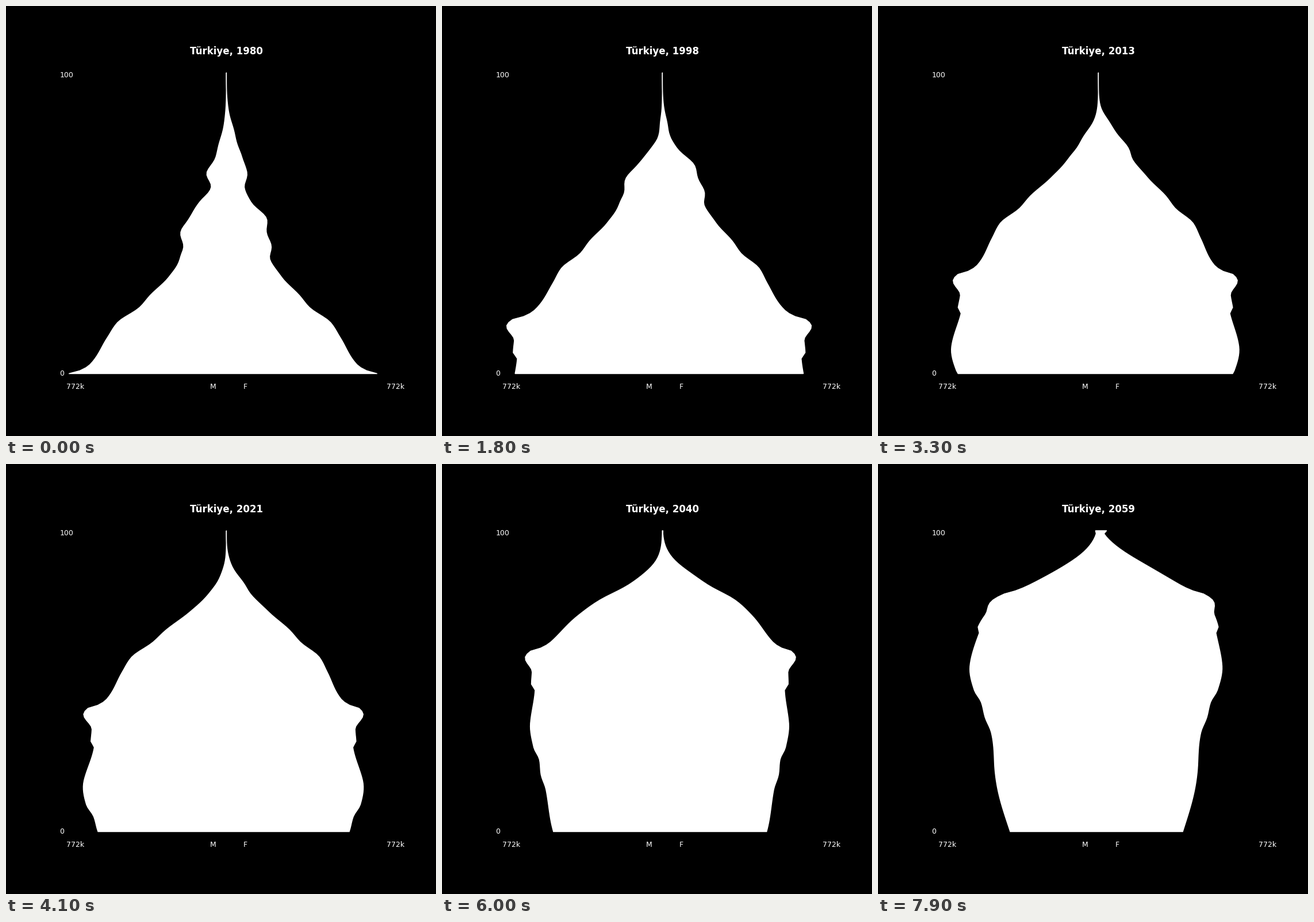
Animation of 748 by 748 pixels, one loop 8 s. Source, as a matplotlib script:

```python
import numpy as np
import matplotlib.pyplot as plt
from matplotlib.animation import FuncAnimation

SIZE, DPI = 748, 100
START, YEARS = 1980, 80
LIMIT = 772  # thousands of people at the edge of the axes
AGES = np.arange(101)

# turning points of the birth curve: year, thousands of boys
BIRTHS = np.array([
    (1890, 160), (1908, 128), (1913, 152), (1918, 107), (1923, 152), (1929, 221),
    (1934, 237), (1941, 240), (1948, 301), (1954, 389), (1958, 434), (1963, 530),
    (1968, 567), (1977, 637), (1979, 682), (1980, 733), (1982, 754), (1987, 703),
    (1991, 701), (1993, 679), (2004, 693), (2012, 661), (2016, 621), (2021, 597),
    (2026, 559), (2039, 511), (2059, 410)], float)


def pchip(x, y, q):
    """Shape-preserving cubic through (x, y), evaluated at q."""
    h, d = np.diff(x), np.diff(y) / np.diff(x)
    m = np.r_[d[0], np.zeros(len(x) - 2), d[-1]]
    same = d[:-1] * d[1:] > 0
    a, b = np.where(same, d[:-1], 1), np.where(same, d[1:], 1)
    w1, w2 = 2 * h[1:] + h[:-1], h[1:] + 2 * h[:-1]
    m[1:-1] = np.where(same, (w1 + w2) / (w1 / a + w2 / b), 0)
    q = np.clip(q, x[0], x[-1])
    i = np.clip(np.searchsorted(x, q) - 1, 0, len(h) - 1)
    s = (q - x[i]) / h[i]
    return ((1 + 2 * s) * (1 - s) ** 2 * y[i] + s * (1 - s) ** 2 * h[i] * m[i]
            + s * s * (3 - 2 * s) * y[i + 1] + s * s * (s - 1) * h[i] * m[i + 1])


def sigmoid(x):
    return 1 / (1 + np.exp(-x))


def survival(age, born, level, slope, gain):
    """Losses among young adults, then mortality that eases for later cohorts."""
    young = 1 - 0.11 * sigmoid((age - 20) / 6) - 0.0004 * age
    old = age - 79
    hazard = np.exp(level + slope * old - 0.0007 * old ** 2
                    - gain * (np.maximum(born, 1920) - 1980))
    return young * np.exp(-hazard)


def people(year):
    """Men and women at each age; the last bin gathers ages 100 to 102."""
    age = np.arange(103)
    born = year - age
    births = pchip(*BIRTHS.T, born)
    # early cohorts alternate between more men and more women
    wave = (0.05 * np.cos(2 * np.pi * (born - 1938) / 10)
            * sigmoid((1941 - born) / 1.5))
    men = births * (1 - wave) * survival(age, born, -1.0, 0.104, 0.025)
    women = 0.957 * births * (1 + wave) * survival(age, born, -1.55, 0.115, 0.026)
    return [np.r_[n[:100], n[100:].sum()] for n in (men, women)]


plt.rcParams["font.family"] = "DejaVu Sans"
fig = plt.figure(figsize=(SIZE / DPI, SIZE / DPI), dpi=DPI, facecolor="black")
ax = fig.add_axes([0.125, 0.11, 0.775, 0.77])
ax.set(xlim=(-LIMIT, LIMIT), ylim=(-5, 105))
ax.axis("off")


def label(x, y, text, **style):
    return ax.text(x, y, text, color="white", transform=ax.transAxes,
                   **{"fontsize": 9, **style})


title = label(0.5, 1.01, "", fontsize=12, weight="bold", ha="center")
label(0, 0.94, "100")
label(0, 0.04, "0")
for x, text in [(0.02, f"{LIMIT}k"), (0.45, "M"), (0.55, "F"), (0.98, f"{LIMIT}k")]:
    label(x, 0, text)

shape, = ax.fill([0], [0], fc="white", ec="white", lw=1)


def draw(i):
    men, women = people(START + i)
    shape.set_xy(np.column_stack([np.r_[-men, women[::-1]],
                                  np.r_[AGES, AGES[::-1]]]))
    title.set_text(f"Türkiye, {START + i}")
    return shape, title


anim = FuncAnimation(fig, draw, frames=YEARS, interval=100, repeat=True,
                     repeat_delay=0)
plt.show()
```
